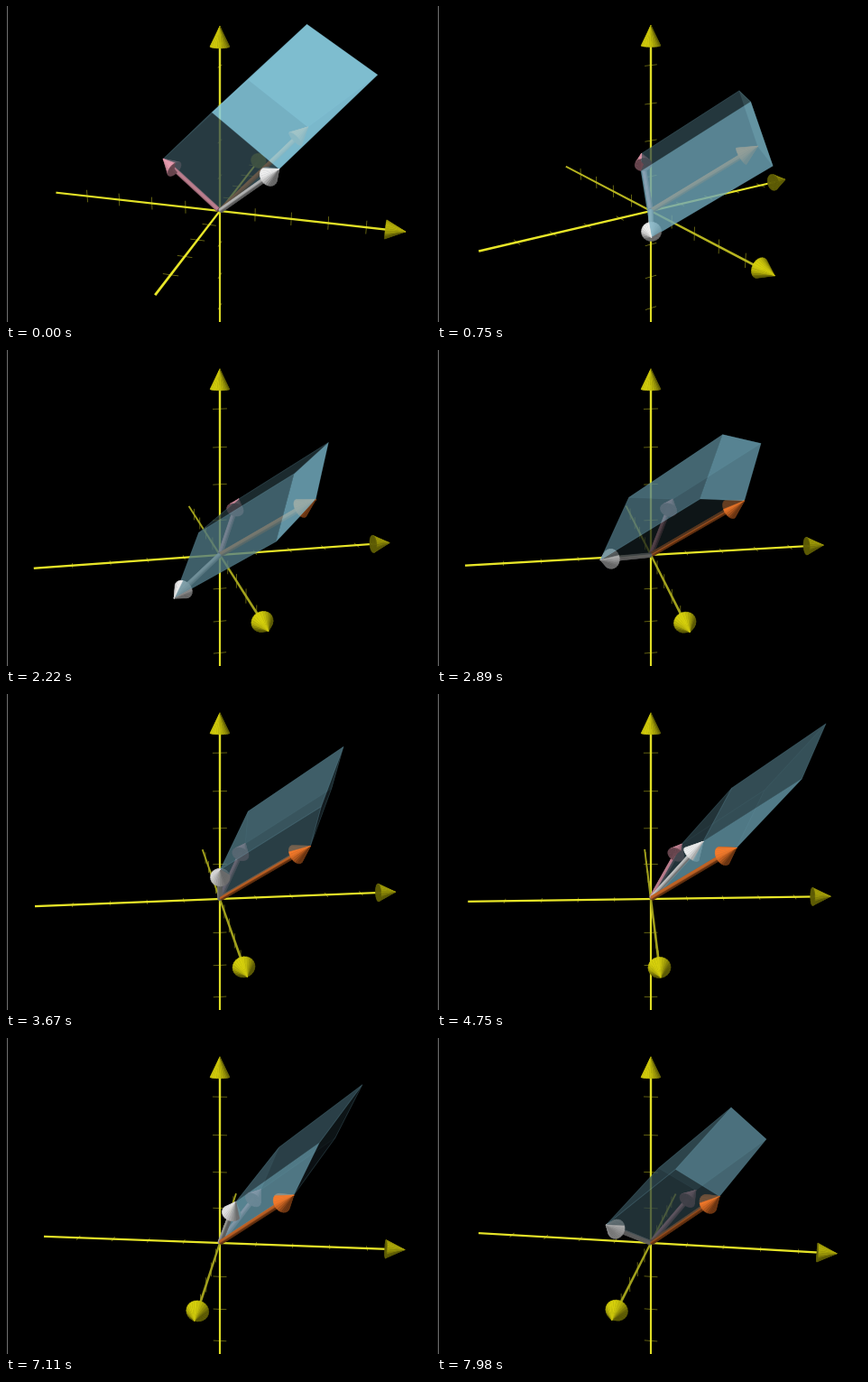
Write a matplotlib script that moves like this. It is 471x350 px and loops after 8 s.

```python
import numpy as np
import matplotlib.pyplot as plt
from matplotlib.animation import FuncAnimation
from matplotlib.collections import PolyCollection

W, H = 471, 350
LOOP_MS, TICK_MS, STEP_MS = 8000, 40, 128.7
ORIGIN = np.array([237, 227])
UNIT, DIST = 40.2, 21.0          # pixels per unit, camera distance

YELLOW = np.array([232, 230, 40]) / 255
HEAD_YELLOW = np.array([214, 208, 12]) / 255
ORANGE = np.array([246, 122, 42]) / 255
PINK = np.array([236, 158, 178]) / 255
WHITE = np.array([240, 240, 240]) / 255
BLUE = np.array([118, 177, 196]) / 255
CLEAR = (0, 0, 0, 0)

ORANGE_VEC = np.array([2.0, 2.0, 2.0])
PINK_VEC = np.array([-2.0, 1.0, 1.0])

# path of the white vector: step, then x, y, z
PATH = np.array([
    [0, 1.94, -1.52, 1.92], [12, 2.10, -1.26, -0.86], [22, 1.95, -1.59, 0.65],
    [28, 1.53, -0.17, 1.33], [37, 0.62, 1.34, 1.79], [44.3, 0.08, 1.92, 1.95],
    [48, 0.31, 1.61, 1.84], [62, 1.95, -0.80, 1.11]])
KEYS, POINTS = PATH[:, 0], PATH[:, 1:]
SLOPES = np.gradient(POINTS, KEYS, axis=0)


def smooth(u):
    u = min(max(u, 0), 1)
    return u * u * (3 - 2 * u)


def white_vec(step):
    """Cubic Hermite curve through the path points."""
    i = min(np.searchsorted(KEYS, step, side="right") - 1, len(KEYS) - 2)
    h = KEYS[i + 1] - KEYS[i]
    u = (step - KEYS[i]) / h
    return ((1 + 2 * u) * (1 - u) ** 2 * POINTS[i]
            + u * (1 - u) ** 2 * h * SLOPES[i]
            + u * u * (3 - 2 * u) * POINTS[i + 1]
            + u * u * (u - 1) * h * SLOPES[i + 1])


def unit(v):
    return v / np.linalg.norm(v)


class Camera:
    def __init__(self, step):
        swing = 1 - smooth(step / 9.5)
        a = np.radians(14.45 - 0.482 * (step - 12) + 53.4 * swing)
        phi = np.radians(70.4 - 2.8 * swing)
        ground = np.array([np.cos(a), -np.sin(a), 0])
        up = np.array([0, 0, 1])
        self.toward = ground * np.sin(phi) + up * np.cos(phi)
        self.up = up * np.sin(phi) - ground * np.cos(phi)
        self.right = np.array([np.sin(a), np.cos(a), 0])
        self.pos = self.toward * DIST

    def project(self, pts):
        pts = np.atleast_2d(pts)
        scale = UNIT / (1 - pts @ self.toward / DIST)
        flat = np.stack([pts @ self.right, -(pts @ self.up)], axis=1)
        return ORIGIN + flat * scale[:, None]

    def faces(self, normal, point):
        return normal @ (self.pos - point) > 0

    def light(self, normal):
        lit = (-0.45 * normal @ self.right + 0.5 * normal @ self.up
               + 0.74 * normal @ self.toward)
        return min(1, 0.45 + 0.58 * max(0, lit))


def solid(cam, a, b, ra, rb, color, n):
    """Visible patches of a round rod or cone: (corners, middle, color)."""
    d = unit(b - a)
    e1 = unit(np.cross(d, [1, 0, 0] if abs(d[2]) > 0.7 else [0, 0, 1]))
    e2 = np.cross(d, e1)
    t = np.linspace(0, 2 * np.pi, n + 1)[:, None]
    spokes = np.cos(t) * e1 + np.sin(t) * e2
    low, high = a + ra * spokes, b + rb * spokes
    patches = []
    for i in range(n):
        quad = np.array([low[i], low[i + 1], high[i + 1], high[i]])
        normal = unit(unit(spokes[i] + spokes[i + 1])
                      + d * (ra - rb) / np.linalg.norm(b - a))
        mid = quad.mean(axis=0)
        if cam.faces(normal, mid):
            patches.append((quad, mid, color * cam.light(normal)))
        if cam.faces(-d, a):
            fan = np.array([a, low[i], low[i + 1]])
            patches.append((fan, fan.mean(axis=0), color * 0.45))
    return patches


def cone(cam, tip, color):
    return solid(cam, tip - 0.5 * unit(tip), tip, 0.25, 0, color, 24)


class Canvas:
    """Collects polygons back to front."""

    def __init__(self, step):
        self.cam = Camera(step)
        self.verts, self.fills, self.edges = [], [], []

    def add(self, pts, fill, edge=CLEAR):
        self.verts.append(self.cam.project(pts))
        self.fills.append(fill)
        self.edges.append(edge)

    def patches(self, items):
        for corners, _, color in items:
            self.add(corners, (*color, 1), (*color, 0.6))

    def strip(self, a, b, radius, color):
        side = unit(np.cross(b - a, self.cam.toward)) * radius
        self.add([a + side, b + side, b - side, a - side], (*color, 1))


def draw_axes(cv):
    eye = np.eye(3)
    tick_dirs = (eye[2], eye[0], eye[1])
    tick_color = (*(YELLOW * 0.5), 1)
    order = sorted(range(3), key=lambda k: eye[k] @ cv.cam.toward)
    for k in order:
        off = 0.19 * tick_dirs[k]
        for m in (-4, -3, -2, -1, 1, 2, 3, 4):
            cv.add([m * eye[k] - off, m * eye[k] + off], CLEAR, tick_color)
    for k in order:
        d = eye[k]
        dim = 1 - 0.35 * max(0, d @ cv.cam.toward) ** 2
        cv.strip(-5 * d, 4.6 * d, 0.028, YELLOW * dim)
        cv.patches(cone(cv.cam, 5 * d, HEAD_YELLOW))


def box_faces(cam, vecs):
    """Faces as (corners, brightness, is_front)."""
    center = sum(vecs) / 2
    for k in range(3):
        a, b = vecs[(k + 1) % 3], vecs[(k + 2) % 3]
        n = unit(np.cross(a, b))
        for base in (np.zeros(3), vecs[k]):
            mid = base + (a + b) / 2
            out = n if n @ (mid - center) > 0 else -n
            front = cam.faces(out, mid)
            view = 0.9 * out @ cam.toward if front else 0.25
            lit = view + 0.25 * out[2] + 0.3 * out[0]
            yield (np.array([base, base + a, base + a + b, base + b]),
                   min(max(lit, 0.06), 1), front)


def hidden_by_box(cam, inverse, point):
    """Slab test of the sight line in the coordinates of the box."""
    start, ray = inverse @ point, inverse @ (cam.pos - point)
    hits = np.sort([-start / ray, (1 - start) / ray], axis=0)
    return max(hits[0].max(), 0) < hits[1].min()


def draw_box(cv, step):
    cam = cv.cam
    vecs = [ORANGE_VEC, PINK_VEC, white_vec(step)]
    inverse = np.linalg.inv(np.array(vecs).T)
    arrows = sorted(zip(vecs, (ORANGE, PINK, WHITE)),
                    key=lambda arrow: arrow[0] @ cam.toward)
    behind, before = [], []
    for v, color in arrows:
        neck = v - 0.5 * unit(v)
        shaft = solid(cam, 0.02 * v, neck, 0.06, 0.06, color * 0.85, 12)
        for patch in shaft + cone(cam, v, color):
            hidden = hidden_by_box(cam, inverse, patch[1])
            (behind if hidden else before).append(patch)

    def paint(corners, lit, front):
        alpha = 0.6 + 0.2 * lit if front else 0.3
        tone = np.clip(BLUE * lit / alpha, 0, 1)
        cv.add(corners, (*tone, alpha), (*BLUE, 0.18 if front else 0.08))

    faces = sorted(box_faces(cam, vecs), key=lambda face: face[2])
    for face in faces[:]:
        if not face[2]:
            paint(*face)
    cv.patches(behind)
    for face in faces:
        if face[2]:
            paint(*face)
    cv.patches(before)


fig = plt.figure(figsize=(W / 100, H / 100), dpi=100, facecolor="black")
ax = fig.add_axes([0, 0, 1, 1])
ax.set_xlim(0, W)
ax.set_ylim(H, 0)
ax.axis("off")
ax.plot([0.5, 0.5], [0, H], color="#707070", lw=0.72)
shapes = PolyCollection([], linewidths=0.6)
ax.add_collection(shapes, autolim=False)


def update(i):
    step = int((i * TICK_MS + 60) / STEP_MS)
    cv = Canvas(step)
    draw_axes(cv)
    draw_box(cv, step)
    shapes.set_verts(cv.verts)
    shapes.set_facecolor(cv.fills)
    shapes.set_edgecolor(cv.edges)
    return (shapes,)


anim = FuncAnimation(fig, update, frames=LOOP_MS // TICK_MS, interval=TICK_MS,
                     repeat=True, repeat_delay=0, blit=False)
plt.show()
```
